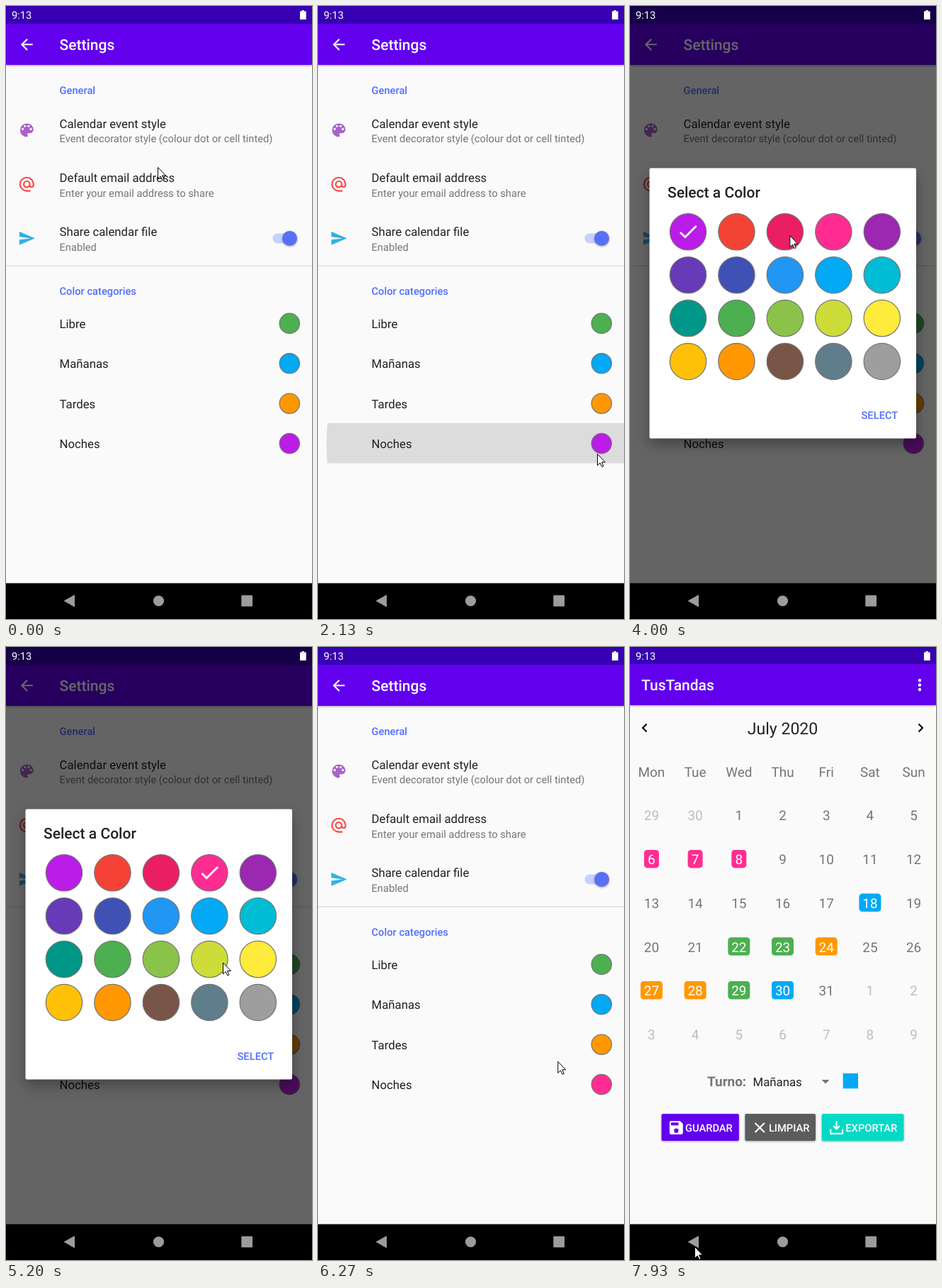
Animation of 432x864 px, one loop 8 s. Source, as an HTML page:

```html
<!DOCTYPE html>
<html lang="en">
<head>
<meta charset="utf-8">
<title>Settings</title>
<style>
html, body { margin: 0; width: 100%; height: 100%; overflow: hidden; background: #000; }
svg { display: block; width: 432px; height: 864px; font-family: Roboto, sans-serif; text-rendering: geometricPrecision; }
.raised { filter: drop-shadow(0 1px 1.5px rgba(0, 0, 0, .35)); }
.panel { filter: drop-shadow(0 9px 9px rgba(0, 0, 0, .3)); }
</style>
</head>
<body>
<svg id="stage" viewBox="0 0 432 864"></svg>
<script>
const LOOP = 8000, FPS = 15;
const DP = 1.05; // stage pixels per layout unit
const INK = '#212121', GREY = '#757575', ACCENT = '#536dfe', PAPER = '#fafafa', VIOLET = '#bb1ce8';
const PINK = '#ff2d92', GREEN = '#4caf50', BLUE = '#03a9f4', ORANGE = '#ff9800';
const SMALL = 14 * DP, BODY = 16 * DP, DAY = 18 * DP, TITLE = 20 * DP;

// Icons on a 24 unit grid: filled shapes and two unit wide strokes.
const SOLID = {
  palette: 'M12 3a9 9 0 0 0 0 18 1.500 1.500 0 0 0 1.100-2.500A1.500 1.500 0 0 1 14.200 16H16a5 5 0 0 0 5-5c0-4.400-4-8-9-8z',
  send: 'M2 21L23 12 2 3v7l15 2-15 2z',
  save: 'M17 3H5a2 2 0 0 0-2 2v14a2 2 0 0 0 2 2h14a2 2 0 0 0 2-2V7zm-5 16a3 3 0 1 1 0-6 3 3 0 0 1 0 6zm3-10H5V5h10z'
};
const LINE = {
  back: 'M20 12H5.500M12.700 4.700L5.400 12l7.300 7.300',
  at: 'M17 21h-5a9 9 0 1 1 9-9v1.400a2.500 2.500 0 0 1-5 0V12a4 4 0 1 1-4-4 4 4 0 0 1 4 4',
  check: 'M4.100 12.700L9 17.600 20.300 6.300',
  clear: 'M5.700 5.700l12.600 12.600m0-12.600L5.700 18.300',
  download: 'M12 3v11M7.700 9.700L12 14l4.300-4.300M4 14v6h16v-6'
};

const text = (s, x, y, size, fill, extra = '') =>
  `<text x="${x}" y="${y}" font-size="${size}" fill="${fill}" ${extra}>${s}</text>`;
const rect = (x, y, w, h, fill, extra = '') =>
  `<rect x="${x}" y="${y}" width="${w}" height="${h}" fill="${fill}" ${extra}/>`;
const circle = (x, y, r, fill, extra = '') =>
  `<circle cx="${x}" cy="${y}" r="${r}" fill="${fill}" ${extra}/>`;
const icon = (name, x, y, color, scale = DP) => {
  const paint = SOLID[name] ? `fill="${color}"` : `fill="none" stroke="${color}" stroke-width="2"`;
  return `<path d="${SOLID[name] || LINE[name]}" ${paint} transform="translate(${x} ${y}) scale(${scale}) translate(-12 -12)"/>`;
};
const each = (list, fn) => list.map(fn).join('');
const MEDIUM = 'font-weight="500"', MIDDLE = 'text-anchor="middle"';
const RING = 'stroke="#757575" stroke-width="1.2"';

function page(title, x, bottom) {
  return rect(0, 0, 432, 814, PAPER) +
    rect(0, 20, 432, bottom - 20, '#6200ee', 'class="raised"') +
    rect(0, 0, 432, bottom - 58, '#3700b3') +
    text(title, x, bottom - 21, TITLE, '#fff', MEDIUM);
}

function settingsPage() {
  const left = 75.5, iconX = 29.3;
  const prefs = [
    ['Calendar event style', 'Event decorator style (colour dot or cell tinted)', 'palette', '#a962c9'],
    ['Default email address', 'Enter your email address to share', 'at', '#f94444'],
    ['Share calendar file', 'Enabled', 'send', '#33b0e5']
  ];
  const shifts = [['Libre', GREEN], ['Mañanas', BLUE], ['Tardes', ORANGE], ['Noches', VIOLET]];
  const hole = (dx, dy) => circle(iconX + dx * DP, 175 + dy * DP, 1.6, PAPER);
  return page('Settings', left, 83) +
    '<g clip-path="url(#row)"><circle id="ripple"/></g>' +
    icon('back', iconX, 54.3, '#fff') +
    text('General', left, 124.3, SMALL, ACCENT, MEDIUM) +
    each(prefs, ([name, note, glyph, color], i) => {
      const y = 175 + 76.2 * i;
      return text(name, left, y - 3, BODY, INK) + text(note, left, y + 17.3, SMALL, GREY) +
        icon(glyph, iconX, y, color);
    }) +
    each([-1, 1], side => hole(5.5 * side, -1.5) + hole(2.5 * side, -5.5)) +
    rect(376.5, 320.5, 34, 14, '#c8d0fd', 'rx="7"') +
    circle(400.6, 327.5, 10.5, '#5870f8', 'class="raised"') +
    rect(0, 365.7, 432, 1.1, '#d5d5d5') +
    text('Color categories', left, 406.5, SMALL, ACCENT, MEDIUM) +
    each(shifts, ([name, fill], i) => {
      const y = 447.4 + 56.4 * i;
      return text(name, left, y + 6.6, BODY, INK) + circle(400.3, y, 14.2, fill, `${RING} id="${name}"`);
    });
}

function colorDialog() {
  const swatches = [VIOLET, '#f44336', '#e91e63', PINK, '#9c27b0',
    '#673ab7', '#3f51b5', '#2196f3', BLUE, '#00bcd4',
    '#009688', GREEN, '#8bc34a', '#cddc39', '#ffeb3b',
    '#ffc107', ORANGE, '#795548', '#607d8b', '#9e9e9e'];
  return rect(27.5, 228.5, 376.5, 381, '#fff', 'rx="2" class="panel"') +
    text('Select a Color', 53, 269.5, TITLE, INK, MEDIUM) +
    each(swatches, (fill, i) =>
      circle(82 + 68.45 * (i % 5), 318.3 + 60.9 * Math.floor(i / 5), 25.7, fill, RING)) +
    `<g id="check">${icon('check', 82, 318, '#fff', 1.4)}</g>` +
    text('SELECT', 326.5, 582.3, SMALL, ACCENT, MEDIUM);
}

function calendarPage() {
  const marks = { [PINK]: [6, 7, 8], [BLUE]: [18, 30], [GREEN]: [22, 23, 29], [ORANGE]: [24, 27, 28] };
  const step = 61.7, colX = i => 30.4 + step * (i % 7);
  const day = (_, i) => {
    const n = i - 1, inside = n > 0 && n < 32;
    const label = n < 1 ? 30 + n : inside ? n : n - 31;
    const fill = Object.keys(marks).find(color => marks[color].includes(n));
    const w = n < 10 ? 21 : 31;
    const x = colX(i), y = 237.5 + step * Math.floor(i / 7);
    return (fill ? rect(x - w / 2, y - 13.3, w, 25.5, fill, 'rx="4.5"') : '') +
      text(label, x, y + 6.9, DAY, fill ? '#fff' : inside ? GREY : '#bdbdbd', MIDDLE);
  };
  const button = (label, x, w, fill, glyph) =>
    rect(x, 658, w, 38, fill, 'rx="2" class="raised"') +
    icon(glyph, x + 20.8, 677.5, '#fff') + text(label, x + 33.5, 683, SMALL, '#fff', MEDIUM);
  return page('TusTandas', 16, 82) +
    each([-1, 0, 1], i => circle(409, 53.5 + 6.5 * i, 2.2, '#fff')) +
    '<path d="M23.500 108.500L18 114l5.500 5.500M407.500 108.500L413 114l-5.500 5.500" fill="none" stroke="#000" stroke-width="2.1"/>' +
    text('July 2020', 215.5, 122.5, 22 * DP, INK, MIDDLE) +
    each(['Mon', 'Tue', 'Wed', 'Thu', 'Fri', 'Sat', 'Sun'], (name, i) =>
      text(name, colX(i), 182.5, DAY, GREY, MIDDLE)) +
    each(Array.from({ length: 42 }), day) +
    text('Turno:', 109, 619.3, DAY, GREY, 'font-weight="700"') +
    text('Mañanas', 173.5, 618.5, BODY, INK) +
    `<path d="M270.500 610h11l-5.500 5.500z" fill="${GREY}"/>` +
    rect(300.7, 601, 21.3, 21.3, BLUE) +
    button('GUARDAR', 44.5, 109.3, '#6200ee', 'save') +
    button('LIMPIAR', 162.4, 99.6, '#5c5c5c', 'clear') +
    button('EXPORTAR', 270.8, 115.6, '#03dac5', 'download');
}

function systemBars() {
  const grey = '#9c9c9c';
  return text('9:13', 8, 18, SMALL, '#fff') +
    '<path d="M415 7.500h2.500V6h3.500v1.500h2.700V19H415z" fill="#fff"/>' +
    rect(0, 813.5, 432, 51, '#000') +
    `<path d="M97 829.700v17.600l-15.500-8.800z" fill="${grey}"/>` +
    circle(215.5, 838.5, 7.6, grey) + rect(332.3, 830.6, 15.7, 15.7, grey, 'rx="1"');
}

document.getElementById('stage').innerHTML =
  '<clipPath id="row"><rect y="588" width="432" height="56.500"/></clipPath>' +
  settingsPage() +
  rect(0, 0, 432, 814, '#000', 'id="dim"') +
  `<g id="dialog">${colorDialog()}</g>` +
  `<g id="calendar">${calendarPage()}</g>` +
  systemBars() +
  '<path id="cursor" d="M.5.5V16.500L4.200 13 6.800 18.500 9 17.500 6.500 12H11.500z" fill="#fff" stroke="#000"/>';

// Pointer glides; times are in ticks of 1/15 s.
const moves = [
  { from: 2, to: 5, x: 245, y: 518 },
  { from: 6, to: 14, x: 169, y: 817 },
  { from: 14, to: 29, x: 394, y: 631 },
  { from: 36, to: 49, x: 232, y: 373 },
  { from: 49, to: 56, x: 223, y: 324 },
  { from: 59, to: 66, x: 270, y: 309 },
  { from: 74, to: 82, x: 342, y: 580 },
  { from: 93, to: 106, x: 84, y: 845 },
  { from: 106, to: 109, x: 91, y: 845 }
];
const PRESS = 29, OPEN = 32, PICK = 71, CLOSE = 82, LEAVE = 116;

const ramp = (t, from, to) => Math.min(1, Math.max(0, (t - from) / (to - from)));
const ease = p => (1 - Math.cos(Math.PI * p)) / 2;

function pointer(tick) {
  let x = 214, y = 227;
  for (const m of moves) {
    const p = ease(ramp(tick, m.from, m.to));
    x += (m.x - x) * p;
    y += (m.y - y) * p;
  }
  return `translate(${x} ${y})`;
}

function set(id, attrs) {
  const node = document.getElementById(id);
  for (const key in attrs) node.setAttribute(key, attrs[key]);
}

function draw(ms) {
  const tick = Math.floor(ms * FPS / 1000 + .1);
  const opening = ramp(tick, OPEN, OPEN + 2), closing = ramp(tick, CLOSE, CLOSE + 4);
  const grow = ramp(tick, PRESS, OPEN);
  set('cursor', { transform: pointer(tick) });
  set('ripple', {
    cx: 394 - 64 * grow, cy: 631 - 14 * grow, r: 318 * grow,
    opacity: .12 * (1 - ramp(tick, OPEN, OPEN + 3))
  });
  set('dim', { opacity: .6 * opening * (1 - closing ** 1.2) });
  set('dialog', { opacity: opening * (1 - closing) ** 1.6 });
  set('check', { transform: `translate(${tick < PICK ? 0 : 205.4} 0)` });
  set('Noches', { fill: tick < CLOSE ? VIOLET : PINK });
  set('calendar', { opacity: ramp(tick, LEAVE, LEAVE + 3) });
}

const start = performance.now();
function frame() {
  draw((performance.now() - start) % LOOP);
  requestAnimationFrame(frame);
}
frame();
</script>
</body>
</html>
```
